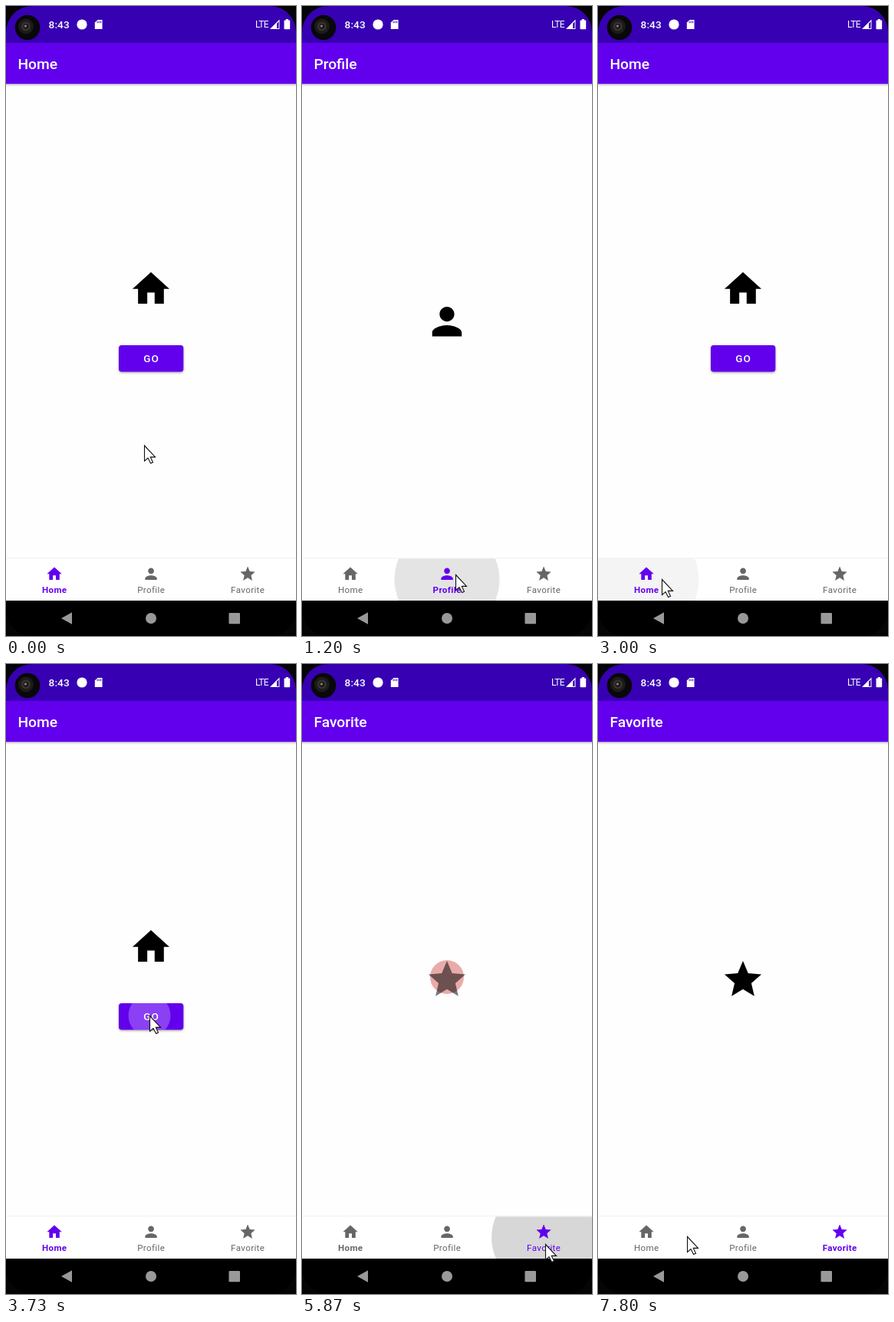
Recreate the animation shown at these times as an HTML page with a canvas. Size 378x819 px, loop 8000 ms.

```html
<!DOCTYPE html>
<html lang="en">
<head>
<meta charset="utf-8">
<title>Bottom navigation</title>
<style>
  html, body { margin: 0; width: 100%; height: 100%; overflow: hidden; background: #000; }
  canvas { display: block; width: 378px; height: 819px; }
</style>
</head>
<body>
<canvas id="stage" width="378" height="819"></canvas>
<script>
const canvas = document.getElementById('stage');
const ctx = canvas.getContext('2d');

const LOOP = 8000;
const STEP = 1000 / 15;
const DP = 0.962;
const PURPLE = '#6200ee';
const GREY = '#666';
const FONT = 'Roboto, sans-serif';

const ICONS = {
  home: new Path2D('M10 20v-6h4v6h5v-8h3L12 3 2 12h3v8z'),
  profile: new Path2D('M12 12c2.21 0 4-1.79 4-4s-1.79-4-4-4-4 1.79-4 4 1.79 4 4 4zm0 2c-2.67 0-8 1.34-8 4v2h16v-2c0-2.66-5.33-4-8-4z'),
  favorite: new Path2D('M12 17.27L18.18 21l-1.64-7.03L22 9.24l-7.19-.61L12 2 9.19 8.63 2 9.24l5.46 4.73L5.82 21z'),
  back: new Path2D('M20 11H7.83l5.59-5.59L12 4l-8 8 8 8 1.41-1.41L7.83 13H20v-2z')
};
const ARROW = new Path2D('M.5 .5V20.5L5 16.6 8.6 23.6 11.5 22.2 8.3 15.4H14.5Z');

const TABS = [
  { id: 'home', label: 'Home', x: 63 },
  { id: 'profile', label: 'Profile', x: 189 },
  { id: 'favorite', label: 'Favorite', x: 315 }
];
const TITLES = { home: 'Home', profile: 'Profile', favorite: 'Favorite', product: 'fragment_product' };

// Tab presses; the page switches shortly after each press.
const PRESSES = [
  { at: 967, tab: 1 },
  { at: 2700, tab: 0 },
  { at: 5700, tab: 2 }
];
const SWITCH_DELAY = 95, FADE = 135;
const GO_PRESS = 3700, GO_OPEN = 3860;

// Pointer moves: start, end, target, optional curve control point.
const START = { x: 179.5, y: 571 };
const MOVES = [
  { from: 0, to: 600, x: 200, y: 739, cx: 217, cy: 655 },
  { from: 1200, to: 1600, x: 310, y: 736 },
  { from: 2067, to: 2533, x: 83, y: 745 },
  { from: 3000, to: 3467, x: 187, y: 457 },
  { from: 3733, to: 3867, x: 190, y: 455 },
  { from: 4267, to: 4533, x: 190, y: 475 },
  { from: 4600, to: 5400, x: 317, y: 754 },
  { from: 6333, to: 7200, x: 216, y: 748 },
  { from: 7200, to: 7800, x: 116, y: 744 }
];

const clamp = v => Math.max(0, Math.min(1, v));
const smooth = v => v * v * (3 - 2 * v);
const easeOut = v => 1 - (1 - v) ** 3;

function rect(x, y, w, h, fill, radius = 0) {
  ctx.fillStyle = fill;
  ctx.beginPath();
  ctx.roundRect(x, y, w, h, radius);
  ctx.fill();
}

function disc(x, y, r, fill) {
  ctx.fillStyle = fill;
  ctx.beginPath();
  ctx.arc(x, y, r, 0, Math.PI * 2);
  ctx.fill();
}

function shape(points, fill) {
  ctx.fillStyle = fill;
  ctx.beginPath();
  points.forEach(([x, y]) => ctx.lineTo(x, y));
  ctx.closePath();
  ctx.fill();
}

function icon(name, x, y, scale, fill) {
  ctx.save();
  ctx.translate(x, y);
  ctx.scale(scale, scale);
  ctx.fillStyle = fill;
  ctx.fill(ICONS[name]);
  ctx.restore();
}

function text(str, x, y, size, weight, fill, { align = 'left', spacing = 0 } = {}) {
  ctx.font = `${weight} ${size}px ${FONT}`;
  ctx.letterSpacing = spacing + 'px';
  ctx.textAlign = align;
  ctx.fillStyle = fill;
  ctx.fillText(str, x, y);
}

function shadow(y, h, alpha) {
  const g = ctx.createLinearGradient(0, y, 0, y + h);
  g.addColorStop(0, `rgba(0,0,0,${alpha})`);
  g.addColorStop(1, 'rgba(0,0,0,0)');
  rect(0, y, 378, h, g);
}

function stateAt(t) {
  const state = { page: 'home', previous: null, fade: 1, tab: 0, boldTab: 0 };
  for (const { at, tab } of PRESSES) {
    const since = t - at - SWITCH_DELAY;
    if (since < 0) break;
    state.previous = tab === 2 ? 'product' : state.page;
    state.page = TABS[tab].id;
    state.fade = clamp(since / FADE);
    state.tab = tab;
    if (state.fade === 1) state.boldTab = tab;
  }
  if (state.page === 'home' && t >= GO_OPEN) state.page = 'product';
  return state;
}

function pointerAt(t) {
  let p = START;
  for (const m of MOVES) {
    if (t < m.from) break;
    const u = smooth(clamp((t - m.from) / (m.to - m.from)));
    const cx = m.cx ?? (p.x + m.x) / 2;
    const cy = m.cy ?? (p.y + m.y) / 2;
    const mix = (a, c, b) => (1 - u) ** 2 * a + 2 * u * (1 - u) * c + u * u * b;
    p = { x: mix(p.x, cx, m.x), y: mix(p.y, cy, m.y) };
  }
  return p;
}

function drawStatusBar() {
  rect(0, 0, 378, 48, '#3700b3');
  disc(28, 28, 16.3, '#08070a');
  disc(26, 26.5, 10, '#1d1a1a');
  disc(26, 26.5, 6, '#353231');
  disc(26, 26.5, 3.2, '#171515');
  disc(25.5, 26, 1.6, '#8b8785');

  text('8:43', 55.5, 29, 13.7, 500, '#fff', { spacing: 0.1 });
  disc(99, 24, 6.6, '#fff');

  shape([[119.3, 18], [125.5, 18], [125.5, 30], [115.8, 30], [115.8, 21.5]], '#fff');
  for (const x of [118.6, 120.8, 123]) rect(x, 19.5, 1, 2.7, '#3700b3');

  text('LTE', 325, 28, 12, 400, '#fff', { spacing: -0.6 });
  shape([[344, 30], [356.5, 17.5], [356.5, 30]], '#fff');
  shape([[353, 22.8], [355.5, 20.3], [355.5, 29], [353, 29]], '#3700b3');
  rect(362.5, 18.5, 7.7, 11.7, '#fff', 1);
  rect(364.8, 17, 3.1, 2, '#fff');
}

function drawToolbar(page) {
  shadow(101, 4, 0.2);
  rect(0, 48, 378, 53.3, PURPLE);
  const nested = page === 'product';
  if (nested) icon('back', 15.4, 62.6, DP, '#fff');
  text(TITLES[page], nested ? 69.2 : 15.4, 82, 19.24, 500, '#fff');
}

function drawGoButton(t) {
  ctx.save();
  ctx.shadowColor = 'rgba(0,0,0,.35)';
  ctx.shadowBlur = 3;
  ctx.shadowOffsetY = 1.2;
  rect(147, 441, 84.3, 34.6, PURPLE, 3.8);
  ctx.restore();

  const since = t - GO_PRESS;
  if (since >= 0 && t < GO_OPEN) {
    ctx.save();
    ctx.beginPath();
    ctx.roundRect(147, 441, 84.3, 34.6, 3.8);
    ctx.clip();
    disc(187, 457, 21 + 25 * easeOut(clamp(since / 350)), 'rgba(255,255,255,.25)');
    ctx.restore();
  }
  text('GO', 189.6, 463.2, 13.47, 500, '#fff', { align: 'center', spacing: 1.2 });
}

function drawPage(page, alpha, t) {
  ctx.globalAlpha = alpha;
  if (page === 'home') {
    icon('home', 160.1, 338.9, 2.404, '#000');
    drawGoButton(t);
  } else if (page === 'product') {
    disc(189, 407, 22, '#d04e4c');
  } else {
    icon(page, 160.1, 381.3, 2.404, '#000');
  }
  ctx.globalAlpha = 1;
}

function drawRipple(t) {
  for (const { at, tab } of PRESSES) {
    const since = t - at;
    if (since < 0 || since > 360) continue;
    const alpha = 0.157 * clamp(since / 75) * (1 - clamp((since - 175) / 175));
    const radius = 38 + 30.5 * easeOut(clamp(since / 225));
    disc(TABS[tab].x, 745.5, radius, `rgba(0,0,0,${alpha})`);
  }
}

function drawTabs(t, { tab, boldTab }) {
  rect(0, 717.5, 378, 1, '#eee');
  rect(0, 718.5, 378, 54.5, '#fff');
  ctx.save();
  ctx.beginPath();
  ctx.rect(0, 718.5, 378, 54.5);
  ctx.clip();
  drawRipple(t);
  ctx.restore();
  TABS.forEach(({ id, label, x }, i) => {
    const color = i === tab ? PURPLE : GREY;
    icon(id, x - 11.5, 726.7, DP, color);
    text(label, x + 0.2, 763, 11.55, i === boldTab ? 700 : 400, color, { align: 'center', spacing: 0.385 });
  });
}

function drawSystemBar() {
  rect(0, 773, 378, 46, '#000');
  shape([[72, 796], [86, 788.3], [86, 803.7]], '#999');
  disc(189, 796, 7, '#999');
  rect(290.5, 789, 14.5, 14.3, '#999', 1);
}

function drawCorners() {
  ctx.fillStyle = '#050507';
  ctx.beginPath();
  ctx.rect(0, 0, 378, 819);
  ctx.roundRect(0, 0, 378, 819, 34);
  ctx.fill('evenodd');
}

function drawPointer({ x, y }) {
  ctx.save();
  ctx.translate(Math.round(x), Math.round(y));
  ctx.fillStyle = '#fff';
  ctx.strokeStyle = '#111';
  ctx.lineWidth = 1.1;
  ctx.fill(ARROW);
  ctx.stroke(ARROW);
  ctx.restore();
}

function draw(t) {
  const state = stateAt(t);
  rect(0, 0, 378, 819, '#fefefe');
  if (state.fade < 1) drawPage(state.previous, 1 - state.fade, t);
  drawPage(state.page, state.fade, t);
  drawToolbar(state.page);
  drawStatusBar();
  drawTabs(t, state);
  drawSystemBar();
  drawCorners();
  drawPointer(pointerAt(t));
}

const begin = performance.now();
function tick() {
  const t = (performance.now() - begin) % LOOP;
  draw(Math.floor((t + 4) / STEP) * STEP % LOOP);
  requestAnimationFrame(tick);
}
tick();
</script>
</body>
</html>
```
